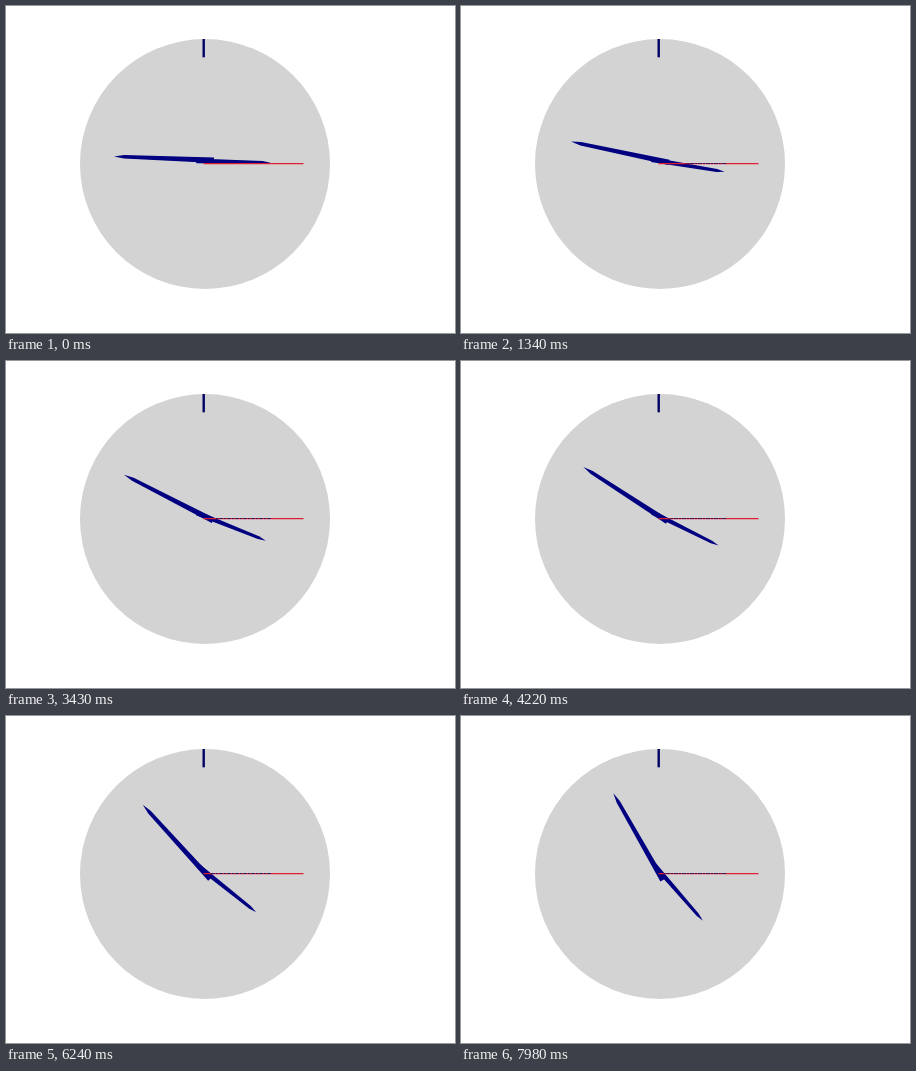
An HTML page that plays this animation: 449 px wide and 327 px high, repeating every 8000 ms.

```html
<!DOCTYPE html>
<html>
<head>
<meta charset="utf-8">
<title>Clock</title>
<style>
  html, body { margin: 0; width: 100%; height: 100%; overflow: hidden; background: #fff; }
  svg { display: block; width: 449px; height: 327px; }
</style>
</head>
<body>
<svg viewBox="0 0 449 327">
  <circle cx="199" cy="158" r="125" fill="#d3d3d3"/>
  <path d="M197.7 33V51.3" stroke="#000064" stroke-width="2.4"/>
  <path id="hour" fill="#000080"/>
  <path id="minute" fill="#000080"/>
  <path d="M197.5 157.6H297.5" stroke="#dc1e32" stroke-width="1.4"/>
  <path id="trace" stroke="#101060" stroke-opacity=".75" stroke-width="1.2" stroke-dasharray="4 1 2 1"/>
</svg>
<script>
const LOOP = 8000;
const [hour, minute, trace] = ['hour', 'minute', 'trace'].map(id => document.getElementById(id));

const polar = (cx, cy, r, deg) => {
  const a = deg * Math.PI / 180;
  return [cx + r * Math.cos(a), cy + r * Math.sin(a)];
};

// A tapered hand from tail to tip, with a pointed end of the given length.
function handPath(tip, tail, point, tipHalf, tailHalf) {
  const dx = tail[0] - tip[0], dy = tail[1] - tip[1];
  const length = Math.hypot(dx, dy), ux = dx / length, uy = dy / length;
  const at = (along, side) =>
    `${(tip[0] + ux * along - uy * side).toFixed(2)} ${(tip[1] + uy * along + ux * side).toFixed(2)}`;
  return 'M' + [at(0, 0), at(point, tipHalf), at(length, tailHalf),
    at(length, -tailHalf), at(point, -tipHalf)].join('L') + 'Z';
}

function draw(ms) {
  const s = ms / 1000;

  const minuteTip = polar(199, 155.5, 91.2, 183.2 + 7.02 * s);
  const minuteTail = polar(198.8, 155.4, 9.2, -7 + 9.8 * s);
  minute.setAttribute('d', handPath(minuteTip, minuteTail, 10, 1.8, 2.7));

  const hourAngle = 1.5 + 5.95 * s;
  const hourTip = polar(198.6, 155, 66, hourAngle);
  const hourTail = polar(198.6, 155, 8.3, hourAngle + 180);
  hour.setAttribute('d', handPath(hourTip, hourTail, 8, 1.5, 2.4));

  // The hour hand leaves a dark trace on the red line as it sweeps away.
  const start = Math.min(265, 199 + 4.2 / Math.tan(hourAngle * Math.PI / 180));
  trace.setAttribute('d', `M265 157.5H${start.toFixed(2)}`);
}

const origin = performance.now();
function tick() {
  draw((performance.now() - origin) % LOOP);
  requestAnimationFrame(tick);
}
tick();
</script>
</body>
</html>
```
